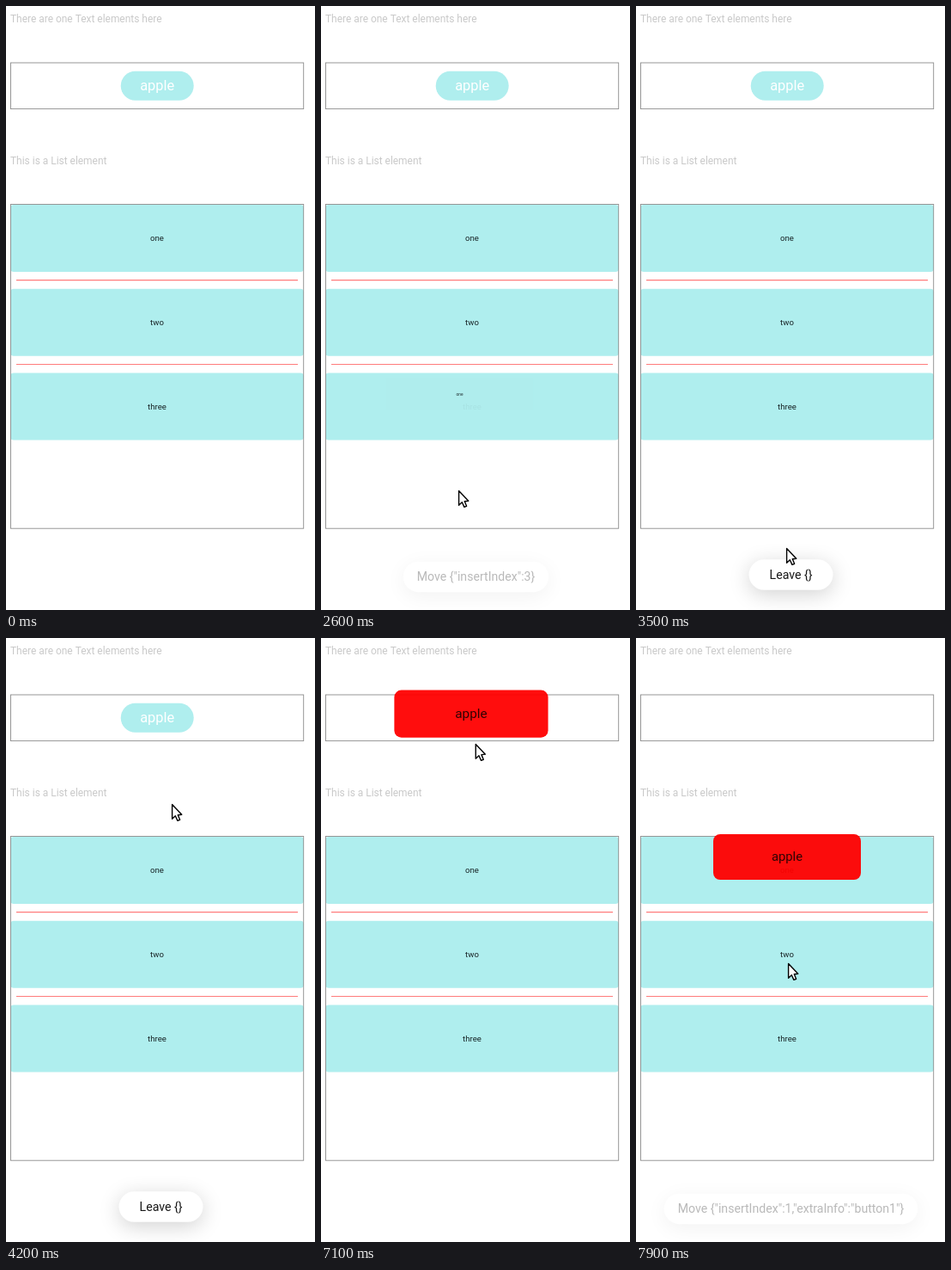
An HTML page with a canvas that plays this animation: 360 px wide and 702 px high, repeating every 8000 ms.

```html
<!DOCTYPE html>
<html lang="en">
<head>
<meta charset="utf-8">
<title>Drag and drop list</title>
<style>
  html, body { margin: 0; width: 100%; height: 100%; overflow: hidden; background: #fff; }
  canvas { display: block; width: 360px; height: 702px; }
</style>
</head>
<body>
<canvas id="stage"></canvas>
<script>
const W = 360, H = 702, MID = 176, LOOP = 8000, STEP = 100, LAG = 150;
const CYAN = '#afeeee', PRESSED = '#9ed6d6', INK = '#182426';
const FONT = 'Roboto, "Noto Sans", sans-serif';

const canvas = document.getElementById('stage');
const ctx = canvas.getContext('2d');
const dpr = window.devicePixelRatio || 1;
canvas.width = W * dpr;
canvas.height = H * dpr;

// Key points of the pointer: time, x, y
const path = [
  [150, 311, 702], [700, 188, 297],
  [2150, 188, 297], [2450, 168.5, 473], [2600, 160, 563], [2950, 175, 630],
  [3700, 175, 630], [4200, 193, 193], [4700, 178, 95],
  [6900, 178, 95], [7350, 182, 162],
  [7500, 182, 162], [7650, 193, 196], [7750, 184.5, 284], [7900, 177, 378]
];

const toasts = [
  { text: 'Move {"insertIndex":3}', from: 2540, to: 3000 },
  { text: 'Leave {}', from: 2850, to: 4800 },
  { text: 'Move {"insertIndex":1,"extraInfo":"button1"}', from: 7840, to: 9800 }
];

const ramp = (t, a, b) => Math.max(0, Math.min(1, (t - a) / (b - a)));
const mix = (a, b, k) => a + (b - a) * k;
const rate = (i, axis) => (path[i + 1][axis] - path[i][axis]) / (path[i + 1][0] - path[i][0]);

// Slope that never overshoots the key points
function slope(i, axis) {
  if (i === 0 || i === path.length - 1) return 0;
  const a = rate(i - 1, axis), b = rate(i, axis);
  return a * b > 0 ? 2 * a * b / (a + b) : 0;
}

function along(t, axis) {
  let i = 0;
  while (i < path.length - 2 && path[i + 1][0] <= t) i++;
  const p = path[i], q = path[i + 1], d = q[0] - p[0];
  const s = ramp(t, p[0], q[0]), r = 1 - s;
  return mix(p[axis], q[axis], s * s * (3 - 2 * s)) +
    d * s * r * (slope(i, axis) * r - slope(i + 1, axis) * s);
}

const pointer = t => ({ x: along(t, 1), y: along(t, 2) });

function box(cx, cy, w, h, r, fill) {
  ctx.beginPath();
  ctx.roundRect(cx - w / 2, cy - h / 2, w, h, r);
  ctx.fillStyle = fill;
  ctx.fill();
}

function label(str, x, y, size, color, align = 'center') {
  ctx.font = `${size}px ${FONT}`;
  ctx.textAlign = align;
  ctx.fillStyle = color;
  ctx.fillText(str, x, y);
}

function scaled(cx, cy, k, alpha, paint) {
  ctx.save();
  ctx.globalAlpha = alpha;
  ctx.translate(cx, cy);
  ctx.scale(k, k);
  paint();
  ctx.restore();
}

function item(str, cx, cy, k = 1, alpha = 1) {
  scaled(cx, cy, k, alpha, () => {
    box(0, 0, 342, 78, 4, CYAN);
    label(str, 0, 3.2, 9.6, INK);
  });
}

function frame(top, bottom) {
  ctx.strokeStyle = '#8c8c8c';
  ctx.lineWidth = 0.9;
  ctx.strokeRect(5.5, top, 341.2, bottom - top);
}

function heading(str, y) {
  label(str, 5, y, 11.95, '#c9c9c9', 'left');
}

function button(t) {
  const k = 1 + 0.05 * ramp(t, 6400, 6800);
  scaled(MID + 0.2, 92.7, k, 1, () => {
    box(0, 0, 85, 34, 17, t >= 5800 ? PRESSED : CYAN);
    label('apple', 0, 5.2, 16.4, '#fff');
  });
}

function page(t) {
  heading('There are one Text elements here', 18.6);
  frame(66, 119.6);
  if (t < 7000) button(t);
  heading('This is a List element', 184);

  ['one', 'two', 'three'].forEach((str, i) => {
    const y = 270 + i * 97.8;
    item(str, MID, y);
    if (i < 2) box(MID, y + 48.7, 328, 1.2, 0, '#ff7c7c');
  });
  frame(230.5, 607.2);
}

function dragItem(t) {
  if (t < 1800 || t >= 3500) return;
  const p = pointer(t - LAG), k = t < 2200 ? 0 : ramp(t, 2100, 2400);
  const size = mix(1 + 0.05 * ramp(t, 1700, 2000), 0.503, k);
  const alpha = 0.95 * (1 - ramp(t, 3100, 3500));
  item('one', mix(MID, p.x - 7, k), mix(270, p.y - 22, k), size, alpha);
}

function dragButton(t) {
  if (t < 7000) return;
  const p = pointer(t - LAG), k = ramp(t, 6900, 7400) ** 2;
  scaled(mix(MID, p.x - 8.5, k), mix(92, p.y - 29.5, k), mix(1.05, 1, k), 0.95, () => {
    box(0, 0, 172, 53, 8, '#f00');
    label('apple', 0, 4.8, 14.8, 'rgba(0,0,0,.85)');
  });
}

function toast({ text, from, to }, t) {
  const show = ramp(t, from, from + 200) * (1 - ramp(t, to - 200, to));
  if (!show) return;
  const y = 661 + 3.4 * (1 - show);
  ctx.save();
  ctx.font = `14.1px ${FONT}`;
  const w = Math.max(98, ctx.measureText(text).width + 32);
  ctx.shadowColor = `rgba(0,0,0,${0.18 * show})`;
  ctx.shadowBlur = 24 * dpr;
  ctx.shadowOffsetY = 5 * dpr;
  box(180.5, y, w, 35.5, 17.7, '#fff');
  ctx.shadowColor = 'transparent';
  ctx.globalAlpha = show;
  label(text, 180.5, y + 4.6, 14.1, '#181818');
  ctx.restore();
}

function arrow({ x, y }) {
  ctx.save();
  ctx.translate(x + 0.6, y + 0.6);
  ctx.beginPath();
  ctx.moveTo(0, 0);
  [[0, 16.6], [3.7, 13.2], [6.3, 18.8], [9, 17.7], [6.7, 12.1], [11.2, 11.6]]
    .forEach(p => ctx.lineTo(...p));
  ctx.closePath();
  ctx.fillStyle = '#fff';
  ctx.strokeStyle = '#000';
  ctx.lineWidth = 1.4;
  ctx.lineJoin = 'round';
  ctx.fill();
  ctx.stroke();
  ctx.restore();
}

function draw(t) {
  ctx.setTransform(dpr, 0, 0, dpr, 0, 0);
  ctx.fillStyle = '#fff';
  ctx.fillRect(0, 0, W, H);
  page(t);
  dragItem(t);
  dragButton(t);
  toasts.forEach(m => toast(m, t));
  if (t >= 200) arrow(pointer(t));
}

const start = performance.now();
function tick() {
  const t = (performance.now() - start) % LOOP;
  draw(Math.floor(t / STEP) * STEP);
  requestAnimationFrame(tick);
}
tick();
</script>
</body>
</html>
```
